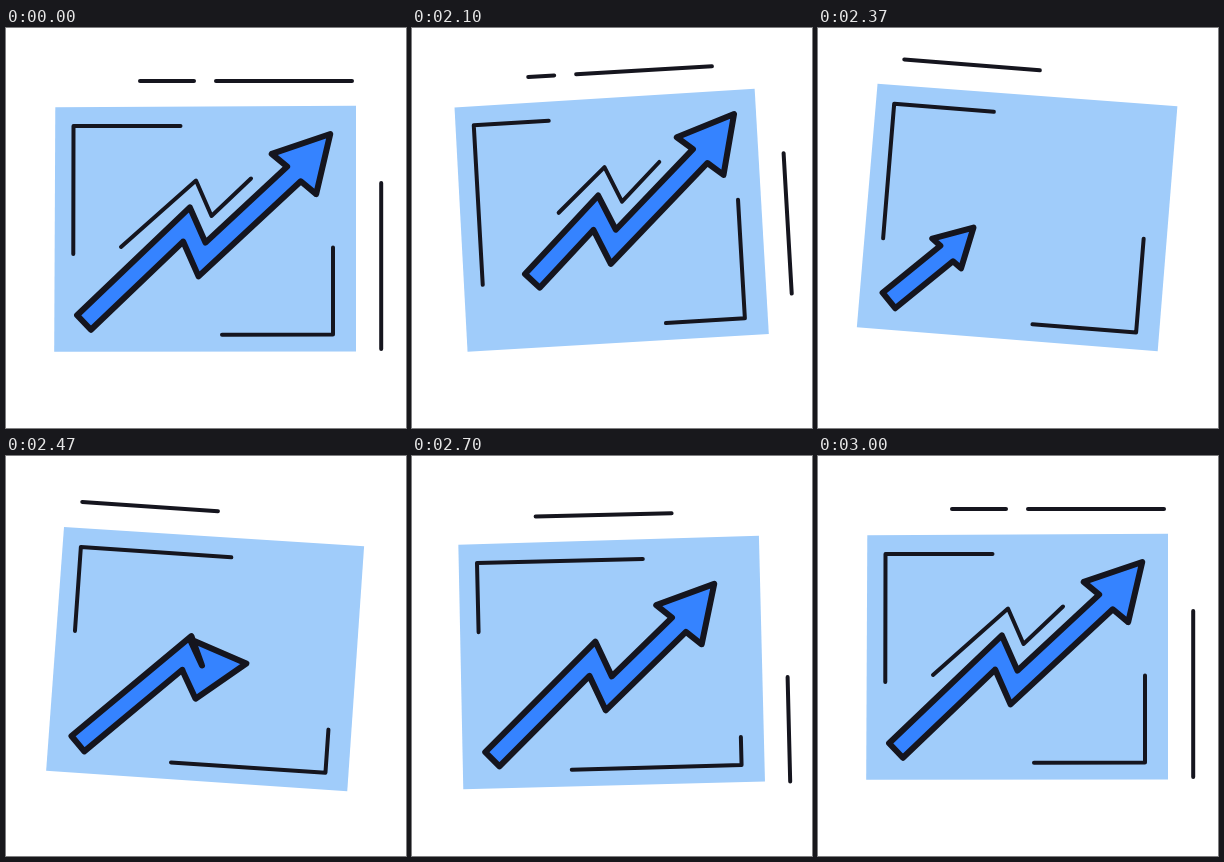
Write an HTML page with a canvas that moves like this. It is 400x400 px and loops after 3020 ms.

```html
<!DOCTYPE html>
<html>
<head>
<meta charset="utf-8">
<style>
html, body { margin: 0; height: 100%; overflow: hidden; background: #fff; }
canvas { display: block; width: 400px; height: 400px; }
</style>
</head>
<body>
<canvas id="stage" width="400" height="400"></canvas>
<script>
const ctx = document.getElementById('stage').getContext('2d');
const INK = '#15151e', BLUE = '#3583ff', CARD = '#a0ccfa';
const CX = 199.3, CY = 201, STEPS = 40;

// Motion keys: [step, value]
const TILT = [[0, 0], [1, -.9], [5, -3.8], [8, -3.1], [15, 4.6], [22, 2.3], [24, .5], [30, -2.1], [32, -1.8], [40, 0]];
const LIFT = [[0, 0], [1, -.3], [8, -17.5], [15, -12], [22, 12], [24, 10], [32, 2.2], [40, 0]];
const SLIDE = [[0, 0], [1, -2], [8, -60], [15, -7], [24, 90], [32, 14], [40, 0]];
const DASH = [[0, 0], [1, -1.7], [8, -84], [15, -136], [24, -132], [32, -29.5], [40, 0]];

const SHAFT = [[78, 294.5], [180.5, 196.5], [196, 231.5], [327.5, 109.2]];
const ECHO = [[115, 219], [190, 152.5], [205.5, 188], [245, 150.5]];

// Smooth curve through the keys, flat at both ends
function curve(keys, k) {
  const i = Math.max(1, keys.findIndex(p => p[0] >= k));
  const slope = j => j > 0 && j < keys.length - 1
    ? (keys[j + 1][1] - keys[j - 1][1]) / (keys[j + 1][0] - keys[j - 1][0]) : 0;
  const [x0, y0] = keys[i - 1], [x1, y1] = keys[i];
  const w = x1 - x0, u = (k - x0) / w, v = 1 - u;
  return y0 * v * v * (1 + 2 * u) + y1 * u * u * (1 + 2 * v)
    + w * u * v * (slope(i - 1) * v - slope(i) * u);
}

const dist = (p, q) => Math.hypot(q[0] - p[0], q[1] - p[1]);
const lengthOf = pts => pts.slice(1).reduce((sum, p, i) => sum + dist(pts[i], p), 0);

// Part of a polyline between two distances
function trim(pts, from, to) {
  const out = [];
  let at = 0;
  for (let i = 1; i < pts.length; i++) {
    const p = pts[i - 1], q = pts[i], len = dist(p, q);
    const a = Math.max(from - at, 0), b = Math.min(to - at, len);
    const point = d => [p[0] + (q[0] - p[0]) * d / len, p[1] + (q[1] - p[1]) * d / len];
    if (b > a) {
      if (!out.length) out.push(point(a));
      out.push(point(b));
    }
    at += len;
  }
  return out;
}

function trace(pts) {
  ctx.beginPath();
  pts.forEach(p => ctx.lineTo(...p));
}

function line(pts, width = 4) {
  if (pts.length < 2) return;
  trace(pts);
  ctx.lineWidth = width;
  ctx.stroke();
}

// One mitred edge of a band around a polyline
function edge(pts, half) {
  const normals = pts.slice(1).map((q, i) => {
    const p = pts[i], len = dist(p, q);
    return [(q[1] - p[1]) / len, (p[0] - q[0]) / len];
  });
  return pts.map((p, i) => {
    const m = normals[Math.max(i - 1, 0)], n = normals[Math.min(i, normals.length - 1)];
    const f = half / (1 + m[0] * n[0] + m[1] * n[1]);
    return [p[0] + (m[0] + n[0]) * f, p[1] + (m[1] + n[1]) * f];
  });
}

function arrow(from, to) {
  const size = Math.min(1, (to - from) / 162);
  const body = trim(SHAFT, from, to - 54 * size);
  if (body.length < 2) return;
  const neck = body[body.length - 1], end = trim(SHAFT, from, to).pop();
  const angle = Math.atan2(end[1] - neck[1], end[0] - neck[0]) - .085;
  const c = Math.cos(angle) * size, s = Math.sin(angle) * size;
  const head = (x, y) => [neck[0] + x * c - y * s, neck[1] + x * s + y * c];
  trace([...edge(body, 10), head(0, -30), head(54, 0), head(0, 30), ...edge(body, -10).reverse()]);
  ctx.closePath();
  ctx.fillStyle = BLUE;
  ctx.fill();
  ctx.lineWidth = 6;
  ctx.stroke();
}

function shifted(x, y, paint) {
  ctx.save();
  ctx.translate(x, y);
  paint();
  ctx.restore();
}

function draw(k) {
  const left = STEPS - k;
  ctx.setTransform(1, 0, 0, 1, 0, 0);
  ctx.fillStyle = '#fff';
  ctx.fillRect(0, 0, 400, 400);
  ctx.translate(CX, CY + curve(LIFT, k));
  ctx.rotate(curve(TILT, k) * Math.PI / 180);
  ctx.translate(-CX, -CY);
  ctx.strokeStyle = INK;
  ctx.lineCap = ctx.lineJoin = 'round';

  trace([[49.3, 79.3], [350, 77.8], [350, 323.5], [48.2, 323.8]]);
  ctx.fillStyle = CARD;
  ctx.fill();

  // Corner brackets
  const slide = curve(SLIDE, k);
  const top = 400 - 67.5 - 107 - slide, bottom = 327 - 111 - slide;
  line(trim([[400, 98], [67.5, 98], [67, 400]], top, top + 235));
  line(trim([[0, 307.3], [327, 306.5], [327, 0]], bottom, bottom + 198));

  // Dashes above
  const d = curve(DASH, k), short = 54 + .75 * d;
  line([[210 + d, 53], [346 + d, 53]]);
  if (short > 0) line([[188 + d - short, 53], [188 + d, 53]]);

  // Bar on the right
  const q = left / 16;
  const [y0, y1] = k < 12
    ? [155 - .7 * k * k, 321 - 2.28 * k * k]
    : [155 + 146.5 * q ** 2.84, 321 + 5.5 * q * q];
  if (y1 > y0) line([[375.2, y0], [375.2, y1]]);

  // Echo line and arrow leave at the head, then grow back from the tail
  const echo = lengthOf(ECHO), shaft = lengthOf(SHAFT);
  if (k < 12) {
    const e = .4 * k + .37 * k * k, a = .6 * k + .196 * k * k;
    shifted(.74 * e, -.67 * e, () => line(trim(ECHO, 2.9 * k + 1.5 * k * k, echo)));
    shifted(.68 * a, -.73 * a, () => arrow(5.1 * k + 1.77 * k * k, shaft));
  } else {
    line(trim(ECHO, 0, echo * (1 - (left / 10.15) ** 3)));
    arrow(0, shaft * (1 - (left / 28.3) ** 3));
  }
}

function frame() {
  const t = performance.now() % 3020;
  draw(t < 2020 ? 0 : Math.min(STEPS, Math.floor((t - 1995) / 25)));
  requestAnimationFrame(frame);
}
frame();
</script>
</body>
</html>
```
